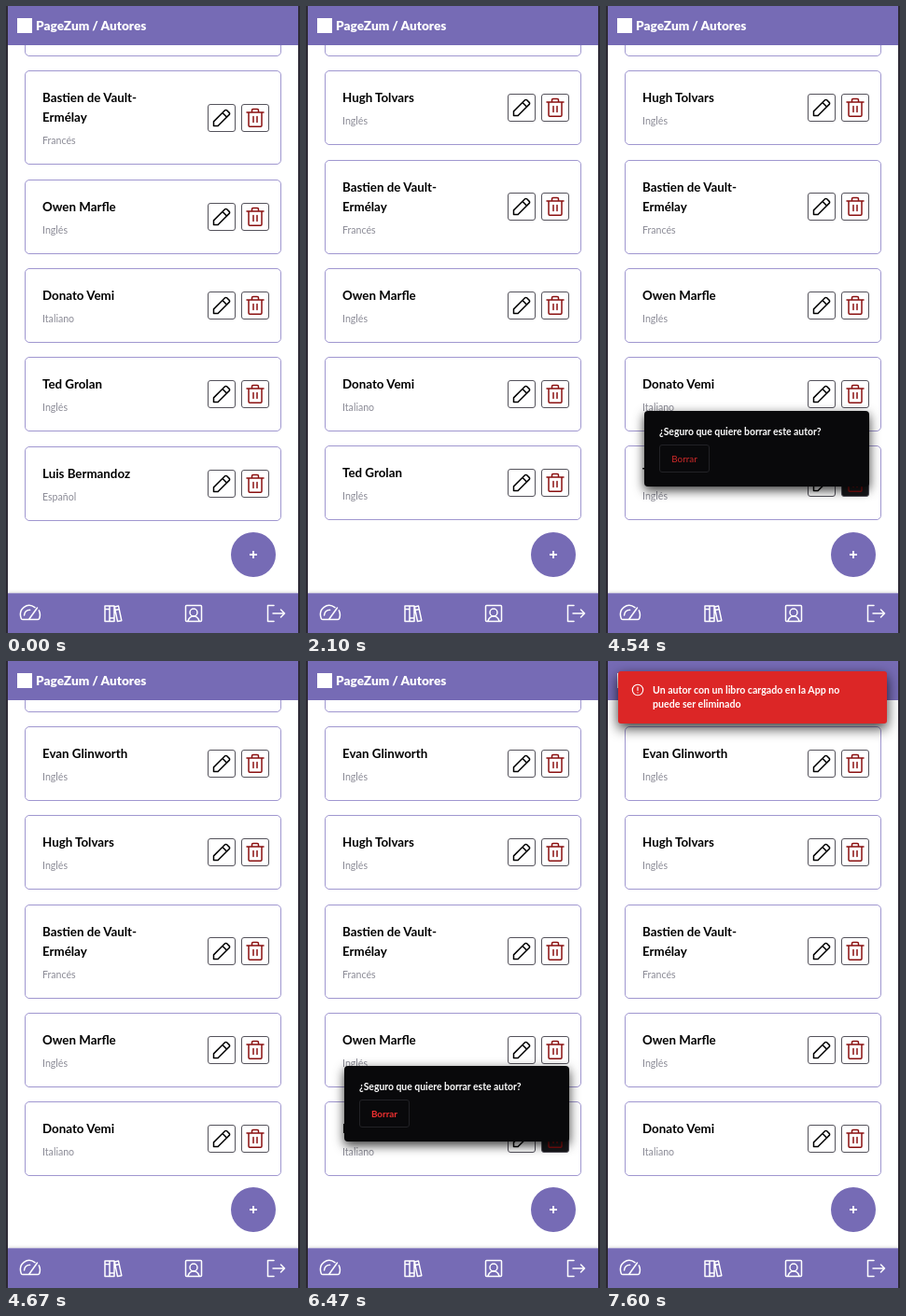
An HTML page that plays this animation: 315x672 px, repeating every 8 s.

```html
<!DOCTYPE html>
<html lang="es">
<head>
<meta charset="utf-8">
<title>Autores</title>
<style>
  :root { --brand: #766bb5; --loop: 8000ms linear infinite both; }
  * { box-sizing: border-box; }
  html, body { margin: 0; width: 100%; height: 100%; overflow: hidden; }
  body { background: #2d2a35; font-family: Lato, "Open Sans", sans-serif; }
  svg { fill: none; stroke: currentColor; stroke-width: 1.5; stroke-linecap: round; stroke-linejoin: round; }

  .stage { position: relative; width: 315px; height: 672px; overflow: hidden; }
  .app { position: absolute; left: 2px; width: 311px; height: 672px; background: #fff; overflow: hidden; }
  .stage > header, .stage > nav { position: absolute; left: 2px; width: 311px; background: var(--brand); color: #fff; }
  header { top: 0; height: 42px; font-size: 13.6px; font-weight: 900; line-height: 42px; padding-left: 30px; white-space: nowrap; }
  header i { position: absolute; left: 10px; top: 13px; width: 16px; height: 16px; background: #fff; }
  nav { top: 629px; height: 43px; border-top: 1px solid #a098cc; box-shadow: 0 -1px 3px #0002; }
  nav svg { position: absolute; top: 9px; width: 24px; height: 24px; }

  .list { position: absolute; left: 18px; width: 275px; display: flex; flex-direction: column; gap: 15.33px; animation: scroll var(--loop); }
  .card { position: relative; flex: none; height: 80px; border: 1px solid #a097d0; border-radius: 5px; padding: 18px 0 0 18px; }
  .card.tall { height: 101px; }
  .card b { display: block; font-size: 13.33px; line-height: 21px; color: #000; white-space: pre; }
  .card small { display: block; margin-top: 6px; font-size: 10.6px; line-height: 16px; color: #8b8b96; }
  .btn { position: absolute; top: 50%; margin-top: -15px; width: 30px; height: 30px; border: 1px solid #55535c; border-radius: 3px; color: #000; background: #fff; }
  .btn svg { position: absolute; left: 2px; top: 2px; width: 24px; height: 24px; }
  .edit { left: 195px; }
  .del { left: 231px; color: #8a1010; }
  .fab { position: absolute; left: 239px; top: 564px; width: 48px; height: 48px; border-radius: 50%; background: var(--brand); color: #fff; }
  .fab svg { position: absolute; left: 18px; top: 18px; width: 12px; height: 12px; stroke-width: 1.8; stroke-linecap: butt; }

  .ask { position: absolute; left: 41px; top: 434px; width: 241px; height: 81px; border-radius: 4px; background: #09090b; color: #fff;
    box-shadow: 0 4px 12px #000c; animation: ask var(--loop); }
  .ask p { position: absolute; left: 16px; top: 14px; margin: 0; font-size: 10.4px; font-weight: 700; line-height: 17px; white-space: nowrap; }
  .ask span { position: absolute; left: 16px; top: 36px; width: 54px; height: 30px; border: 1px solid #222226; border-radius: 3px;
    font-size: 9.9px; line-height: 28px; text-align: center; animation: confirm var(--loop); }

  .toast { position: absolute; left: 13px; top: 11px; width: 288px; height: 56px; border-radius: 3px; background: #dc2626; color: #fff;
    box-shadow: 0 5px 14px #000c; font-size: 10.6px; font-weight: 700; line-height: 15px; white-space: pre; padding: 12.5px 0 0 37px; animation: toast var(--loop); }
  .toast svg { position: absolute; left: 13px; top: 12px; width: 16px; height: 16px; stroke-width: 1.1; }

  .out1 { animation: out1 var(--loop); }
  .out2 { animation: out2 var(--loop); }
  .out1 .del { animation: hot1 var(--loop); }
  .out2 .del { animation: hot2 var(--loop); }
  .kept .del { animation: hot3 var(--loop); }

  @keyframes scroll {
    0%, 24.4% { top: -216.6px; animation-timing-function: ease; }
    26.2%, 57% { top: -121.49px; animation-timing-function: ease; }
    58.375%, 100% { top: -25.33px; }
  }
  @keyframes out1 { 0%, 24.4% { opacity: 1; } 26.2%, 100% { opacity: 0; } }
  @keyframes out2 { 0%, 57% { opacity: 1; } 58.375%, 100% { opacity: 0; } }
  @keyframes hot1 { 0%, 6.2% { background: #fff; } 8.5%, 24.3% { background: #18181b; } 26.1%, 100% { background: #fff; } }
  @keyframes hot2 { 0%, 43.7% { background: #fff; } 46%, 56.9% { background: #18181b; } 58.375%, 100% { background: #fff; } }
  @keyframes hot3 { 0%, 77.99% { background: #fff; } 78% { background: #e3e3e3; } 80.5%, 89.5% { background: #18181b; } 91.2%, 100% { background: #fff; } }
  @keyframes ask {
    0%, 6.24%, 26%, 43.74%, 58.3%, 77.99%, 90.6%, 100% { opacity: 0; transform: scale(.95); }
    6.25%, 43.75%, 78% { opacity: .12; transform: scale(.956); animation-timing-function: ease-out; }
    8.6%, 24.25%, 46.1%, 56.875%, 80.5%, 89.56% { opacity: 1; transform: none; animation-timing-function: ease; }
  }
  @keyframes confirm {
    0%, 56.74% { color: #f03030; font-weight: 700; }
    56.75%, 58.375% { color: #cf2a2a; font-weight: 400; }
    58.38%, 100% { color: #f03030; font-weight: 700; }
  }
  @keyframes toast {
    0%, 89.56% { opacity: 0; transform: translateY(-56px); animation-timing-function: cubic-bezier(.2, .4, .3, 1); }
    94.6%, 100% { opacity: 1; transform: none; }
  }
</style>
</head>
<body>
<svg width="0" height="0" style="position:absolute">
  <symbol id="pencil" viewBox="0 0 24 24">
    <path d="M3.5 20.5v-4.6L15.6 3.8a1.4 1.4 0 0 1 2 0l2.6 2.6a1.4 1.4 0 0 1 0 2L8.1 20.5zM13 6.5l4.6 4.6"/>
  </symbol>
  <symbol id="trash" viewBox="0 0 24 24">
    <path d="M3 6h18M8.5 6V3.8a1.3 1.3 0 0 1 1.3-1.3h4.4a1.3 1.3 0 0 1 1.3 1.3V6M5 6v14a1.2 1.2 0 0 0 1.2 1.2h11.6A1.2 1.2 0 0 0 19 20V6M10 10.5v6M14 10.5v6"/>
  </symbol>
</svg>

<div class="stage">
  <main class="app">
    <div class="list" id="list"></div>
    <div class="fab"><svg viewBox="0 0 12 12"><path d="M6 2v8M2 6h8"/></svg></div>
  </main>

  <header><i></i>PageZum / Autores</header>

  <nav>
    <svg style="left:12px" viewBox="0 0 24 24"><path d="M17 5.6C9-.5-1.500 7 2.300 17.500a1.500 1.500 0 0 0 1.400 1h16.600a1.500 1.500 0 0 0 1.400-1c1-2.800 1-6-.4-8.700M10.500 18.500L19.500 6M5.500 14c.3-3.300 2.800-5.700 6.200-5.800"/></svg>
    <svg style="left:100px" viewBox="0 0 24 24"><path d="M4 4h5v16.500H4zM9 4h5v16.500H9zM14.300 5l4.200-.9 3.300 15.600-4.300.9zM4 7.500h5M9 17h5M15 8.500l4.200-.9"/></svg>
    <svg style="left:187px" viewBox="0 0 24 24"><rect x="3.5" y="3.5" width="17" height="17" rx="1"/><circle cx="12" cy="11" r="4"/><path d="M6 20c1-3 3-5 6-5s5 2 6 5"/></svg>
    <svg style="left:275px" viewBox="0 0 24 24"><path d="M10 3.5H3.5v17H10M9 12h12.500M17.500 8l4 4-4 4"/></svg>
  </nav>

  <div class="ask"><p>¿Seguro que quiere borrar este autor?</p><span>Borrar</span></div>

  <div class="toast"><svg viewBox="0 0 16 16"><circle cx="8" cy="8" r="5.7"/><path d="M8 5v3.5M8 10.8v.1"/></svg>Un autor con un libro cargado en la App no
puede ser eliminado</div>
</div>

<script>
  const authors = [
    ["", ""],
    ["Evan Glinworth", "Inglés"],
    ["Hugh Tolvars", "Inglés"],
    ["Bastien de Vault-\nErmélay", "Francés", "tall"],
    ["Owen Marfle", "Inglés"],
    ["Donato Vemi", "Italiano", "kept"],
    ["Ted Grolan", "Inglés", "out2"],
    ["Luis Bermandoz", "Español", "out1"],
  ];
  const button = (kind, icon) => `<span class="btn ${kind}"><svg><use href="#${icon}"/></svg></span>`;
  document.getElementById("list").innerHTML = authors.map(([name, origin, kind = ""]) =>
    `<div class="card ${kind}"><b>${name}</b><small>${origin}</small>${button("edit", "pencil")}${button("del", "trash")}</div>`
  ).join("");
</script>
</body>
</html>
```
